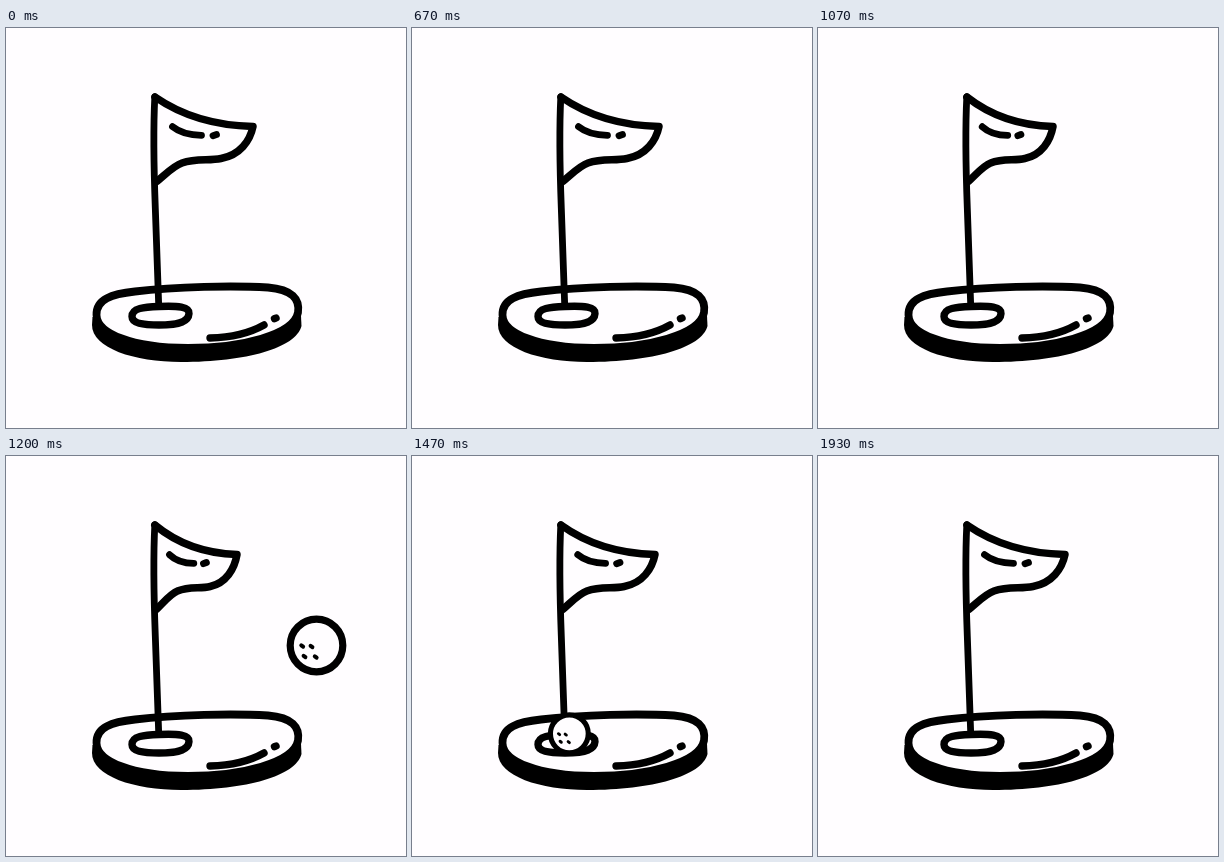
These frames come from a looping animation (400 by 400 pixels, 2000 ms). An HTML page with a canvas:

```html
<!DOCTYPE html>
<html lang="en">
<head>
<meta charset="utf-8">
<title>Golf flag</title>
<style>
html, body { margin: 0; width: 100%; height: 100%; overflow: hidden; background: #fffdff; }
canvas { display: block; width: 400px; height: 400px; }
</style>
</head>
<body>
<canvas id="stage" width="400" height="400"></canvas>
<script>
const canvas = document.getElementById('stage');
const ctx = canvas.getContext('2d');
const dpr = window.devicePixelRatio || 1;
canvas.width = canvas.height = 400 * dpr;
ctx.scale(dpr, dpr);

const LOOP = 2000, FPS = 15, WAVE = 10;
const INK = '#000', PAPER = '#fffdff';

const base = new Path2D('M86.5 289L86 297C86 320 128 334 175 334C240 334 290 320 295.5 298L295 288Z');
const green = new Path2D('M90.5 287C90 271 106 266 129 263.5C170 258.5 228 257.5 262 259.5C286 261.5 294 271 292 284.5C288 307 235 320 182 320C125 320 91 305 90.5 287Z');
const greenShine = new Path2D('M204 310C225 309.5 242 306 258 297M268.5 290.7L270 290');
const hole = new Path2D('M126 288.5C126 280 138 279 153 278.5C172 277.5 183.5 279 183 285.5C182.5 293 175 297 153 297C136 297 126 295 126 288.5Z');
const pole = new Path2D('M148.8 69C147 105 147.8 140 149.3 180L152.7 277');
const flag = new Path2D('M149 69C175 87 207 97.5 247 98.5C244 113 234 127 215 130.5C203 133 190 130 176 135C167 138 158 148 150 154');
const flagShine = new Path2D('M166.5 98.7C173 104 182 107.3 195.5 107.3M207 107.7L210.5 106.5');

// Ball stops: frame, x, y, size
const stops = [
  [17, 375, 155, 1], [18, 310.5, 189.5, 1], [20, 182, 257.5, 0.98],
  [21, 158, 273, 0.9], [24, 156, 287.5, 0.36], [26, 156, 288, 0]
];
const dimples = [[-14.3, 0.5], [-5, 1], [-12, 11], [-0.8, 11.5]];

function line(path, width) {
  ctx.lineWidth = width;
  ctx.strokeStyle = INK;
  ctx.stroke(path);
}

function fill(path, color) {
  ctx.fillStyle = color;
  ctx.fill(path);
}

// Squeeze a path toward the pole while keeping the line weight
function squeeze(path, k) {
  const out = new Path2D();
  out.addPath(path, new DOMMatrix([k, 0, 0, 1, 148 * (1 - k), 0]));
  return out;
}

function drawGreen() {
  fill(base, INK);
  fill(green, PAPER);
  line(green, 7.8);
  line(greenShine, 7.4);
  fill(hole, PAPER);
  line(hole, 7.4);
}

function drawFlag(n) {
  const phase = n % WAVE;
  const shrink = phase > 8 ? 0 : 2 * phase;
  const k = 1 - shrink / 99;
  const cloth = squeeze(flag, k);
  fill(cloth, PAPER);
  line(cloth, 7.5);
  line(squeeze(flagShine, k), 6.8);
  line(pole, 6.8);
}

function drawBall(n) {
  const i = stops.findIndex((s, j) => j < stops.length - 1 && n >= s[0] && n < stops[j + 1][0]);
  if (i < 0) return;
  const a = stops[i], b = stops[i + 1];
  const u = (n - a[0]) / (b[0] - a[0]);
  const [x, y, size] = [1, 2, 3].map(j => a[j] + (b[j] - a[j]) * u);

  ctx.save();
  ctx.translate(x, y);
  ctx.scale(size, size);
  const disc = new Path2D();
  disc.arc(0, 0, 26.3, 0, Math.PI * 2);
  fill(disc, PAPER);
  line(disc, 7.2);
  const marks = new Path2D();
  for (const [dx, dy] of dimples) {
    marks.moveTo(dx - 0.9, dy - 0.7);
    marks.lineTo(dx + 0.9, dy + 0.7);
  }
  line(marks, 4);
  ctx.restore();
}

function draw(now) {
  const n = Math.floor((now % LOOP) * FPS / 1000 + 0.06) % 30;
  ctx.fillStyle = PAPER;
  ctx.fillRect(0, 0, 400, 400);
  ctx.lineCap = ctx.lineJoin = 'round';
  drawGreen();
  drawFlag(n);
  drawBall(n);
}

const start = performance.now();
function tick() {
  draw(performance.now() - start);
  requestAnimationFrame(tick);
}
tick();
</script>
</body>
</html>
```
